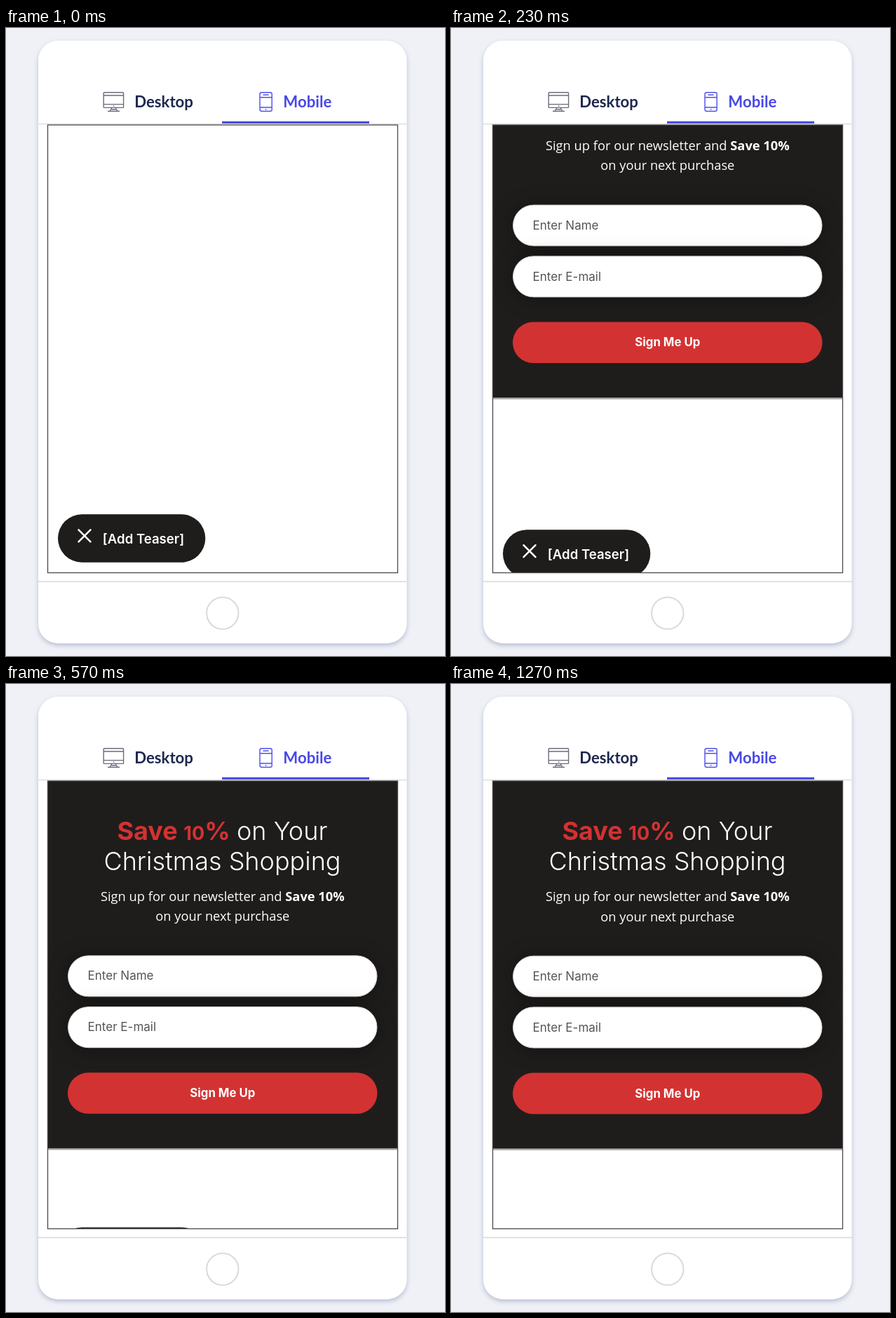
Animation, 626 px wide and 894 px high, one loop 1.31 s. Source, as an HTML page:

```html
<!DOCTYPE html>
<html lang="en">
<head>
<meta charset="utf-8">
<title>Mobile popup preview</title>
<style>
  html, body { margin: 0; width: 100%; height: 100%; overflow: hidden; background: #eff1f7; }
  svg { display: block; width: 626px; height: 894px; }
  text { font-family: Inter, "Open Sans", sans-serif; white-space: pre; }
  .card { fill: #fff; filter: drop-shadow(0 3px 3px rgba(120, 130, 165, .45)); }
  .rule { stroke: #e0e1e5; stroke-width: 1.8; }
  .tab { font: 700 22.2px Lato, sans-serif; }
  .icon { fill: none; stroke-width: 1.4; }
  .title { font-size: 36px; font-weight: 300; fill: #fff; }
  .title .deal { font-weight: 700; fill: #d33232; }
  .title .small { font-size: 27px; }
  .note { font: 400 18.3px "Open Sans", sans-serif; fill: #fff; }
  .mid { text-anchor: middle; }
  .field { fill: #fff; stroke: #d2d2d2; filter: drop-shadow(0 2px 14px rgba(0, 0, 0, .35)); }
  .hint { font-size: 17px; fill: #555; }
  .action { font-size: 16.8px; font-weight: 700; fill: #fff; }
  .teaser { font-size: 18.6px; font-weight: 600; fill: #fff; }
</style>
</head>
<body>
<svg viewBox="0 0 626 894">
  <defs>
    <clipPath id="screen"><rect x="59.5" y="138" width="499" height="637.5"/></clipPath>
  </defs>

  <rect class="card" x="46" y="18" width="525.5" height="858" rx="28"/>
  <path class="rule" d="M46 136.6H571.5M46 788H571.5"/>
  <circle cx="308.8" cy="833" r="22.7" fill="none" stroke="#d6d6d6" stroke-width="1.8"/>

  <g class="icon" stroke="#6b6c7c">
    <rect x="139.2" y="91.8" width="28.4" height="21.6" rx="1"/>
    <path d="M139 96H168M139 108.6H168M151 113.5L148 118.3M156 113.5L159 118.3M145 118.5H162M153 111H154.4M150.5 116H156.5"/>
  </g>
  <text class="tab" x="183.2" y="113" fill="#1d2850">Desktop</text>

  <g class="icon" stroke="#4f50e6">
    <rect x="362" y="91.7" width="17.2" height="26.8" rx="2.4"/>
    <path d="M362 98.7H379M362 113H379M366.5 95.2H374.5M369.8 115.8H371.4"/>
  </g>
  <text class="tab" x="395.3" y="113" fill="#4849e4">Mobile</text>
  <rect x="308" y="132.8" width="210" height="3.1" fill="#4849e4"/>

  <g clip-path="url(#screen)">
    <g id="teaser">
      <rect x="74" y="692.3" width="210.3" height="68.4" rx="34.2" fill="#1f1d1c"/>
      <path d="M103.5 714.3L120.5 731.3M120.5 714.3L103.5 731.3" stroke="#fff" stroke-width="2.5" stroke-linecap="round"/>
      <text class="teaser mid" x="196" y="734">[Add Teaser]</text>
    </g>

    <g id="panel">
      <rect x="59" y="138" width="500" height="525.6" fill="#a5a1a2"/>
      <rect x="59" y="138" width="500" height="523.2" fill="#1f1d1c"/>
      <text class="title" x="158.5" y="222"><tspan class="deal">Save <tspan class="small">10</tspan>%</tspan></text>
      <text class="title" x="329" y="222">on Your</text>
      <text class="title mid" x="308.5" y="265.4">Christmas Shopping</text>
      <text class="note mid" x="308.8" y="309.3">Sign up for our newsletter and <tspan font-weight="700">Save 10%</tspan></text>
      <text class="note mid" x="308.8" y="337.5">on your next purchase</text>
      <rect class="field" x="88.5" y="387.2" width="440.5" height="58" rx="29"/>
      <text class="hint" x="116.6" y="421.8">Enter Name</text>
      <rect class="field" x="88.5" y="460" width="440.5" height="58" rx="29"/>
      <text class="hint" x="116.6" y="494.8">Enter E-mail</text>
      <rect x="88" y="553.6" width="441.5" height="58.6" rx="29.3" fill="#d33232"/>
      <text class="action mid" x="308.8" y="588.6">Sign Me Up</text>
    </g>
  </g>
  <rect x="59.5" y="138" width="499" height="637.5" fill="none" stroke="#4a4a4c" stroke-width="1.3"/>
</svg>

<script>
const LOOP = 1310, FPS = 30;
const panel = document.getElementById("panel");
const teaser = document.getElementById("teaser");

const shift = (el, y) => el.setAttribute("transform", `translate(0 ${y.toFixed(2)})`);

// Panel drops in with a strong ease-out
const panelY = t => -Math.pow(0.0103 * Math.max(0, 641 - t), 3.4);

// Teaser sinks, fastest around 400 ms
const teaserY = t => {
  t = Math.min(t, 800);
  return 0.184 * t - 0.345e-6 * ((t - 400) ** 3 + 400 ** 3);
};

// Hold each pose for one step of a 30 fps clock rounded to 10 ms
function stepTime(t) {
  const step = Math.floor((Math.floor(t / 10) * 10 + 5) * FPS / 1000);
  return Math.round(step * 100 / FPS) * 10;
}

function draw(t) {
  shift(panel, panelY(t));
  shift(teaser, teaserY(t));
}

const start = performance.now();
function tick() {
  draw(stepTime((performance.now() - start) % LOOP));
  requestAnimationFrame(tick);
}
tick();
</script>
</body>
</html>
```
